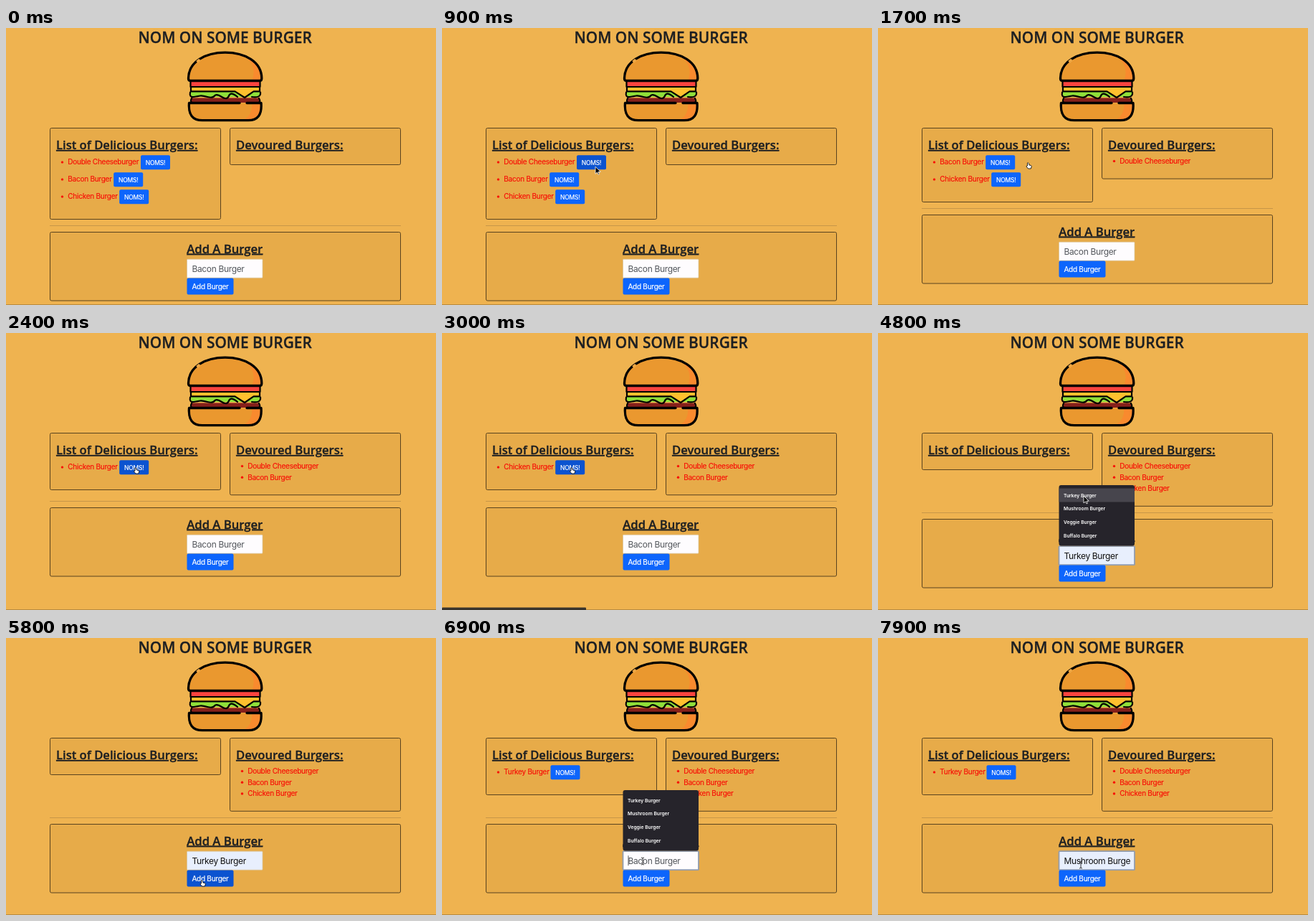
Recreate the animation shown at these times as an HTML page. Size 600x386 px, loop 8000 ms.

```html
<!DOCTYPE html>
<html lang="en">
<head>
<meta charset="utf-8">
<title>Nom on some burger</title>
<style>
html, body { margin: 0; width: 100%; height: 100%; overflow: hidden; background: #efb350; }
svg { display: block; width: 600px; height: 386px; }
text { font: 10px Inter, "Liberation Sans", sans-serif; letter-spacing: -.025em; white-space: pre; }
.h1, .h2 { font: 600 20.85px "Open Sans", sans-serif; letter-spacing: 0; fill: #1d1f22; stroke: #1d1f22; stroke-width: .3; }
.h2 { font-size: 16.65px; text-decoration: underline; }
.mid { text-anchor: middle; }
.item { fill: #f80c06; stroke: #f80c06; stroke-width: .15; }
.btn { fill: #fff; stroke: #fff; stroke-width: .2; }
.noms { font-size: 8.5px; }
.field { font-size: 12px; letter-spacing: -.03em; }
.option { font-size: 6.7px; font-weight: 600; letter-spacing: 0; fill: #fff; }
.card { fill: #e7ab49; stroke: #59431f; }
.line { fill: none; stroke: #000; stroke-width: 3.3; stroke-linejoin: round; stroke-linecap: round; }
.thin { stroke-width: 2.2; }
</style>
</head>
<body>
<svg viewBox="0 0 600 386">
  <defs>
    <clipPath id="fieldClip"><rect x="256" y="0" width="96" height="386"/></clipPath>
    <clipPath id="bunClip"><path id="bun" d="M257 73.500Q254.500 73.500 254.500 70C255 47 278 34.200 305.700 34.200S356.400 47 356.800 70Q356.800 73.500 354.300 73.500Z"/></clipPath>
    <clipPath id="baseClip"><path id="base" d="M255.500 104.500H356Q358 128.700 338 128.700H274Q253.500 128.700 255.500 104.500Z"/></clipPath>
  </defs>
  <rect width="600" height="386" fill="#efb350"/>
  <rect y="385" width="600" height="1" fill="#b88b41"/>
  <text class="h1 mid" x="305.600" y="20.500">NOM ON SOME BURGER</text>
  <g id="burger">
    <use href="#bun" fill="#ea982f"/>
    <path clip-path="url(#bunClip)" d="M325 33C345 46 349 58 343 74H360V33Z" fill="#f98a2e"/>
    <path d="M258 74H354V82H258Z" fill="#f9443f"/>
    <path d="M257 89H355Q354 97 346 96H266Q257 97 257 89Z" fill="#8fe03a"/>
    <path d="M259 97.500H353V104H259Z" fill="#86201b"/>
    <path d="M258 82.500H354V88H345.500L333 97 319.500 88H258Z" fill="#ffc02e"/>
    <use href="#base" fill="#ea982f"/>
    <path clip-path="url(#baseClip)" d="M343 104H360V130H328Q345 123 343 104Z" fill="#f98a2e"/>
    <use href="#bun" class="line"/>
    <path d="M266.500 47.500L270.500 44.300" stroke="#efa743" stroke-width="4"/>
    <path class="line thin" d="M257.500 74V82H354.500V74M258 82V88.300H319.500L333 97 345.500 88.300H354V82M257 89.500Q255.500 97 262 96T271 94.500 281 96 291 94.500 301 96 311 94.500 323 96M343 96Q356 98 355 89.500M259 98Q256 103.500 261 104M352 104Q356 103 353 98"/>
    <path class="line" d="M326 104.500H255.500Q253.500 128.700 274 128.700H338Q358 128.700 356 104.500H336"/>
  </g>
  <g id="scene"></g>
</svg>
<script>
const LOOP = 8000;
const scene = document.getElementById('scene');
const burgers = ['Double Cheeseburger', 'Bacon Burger', 'Chicken Burger'];
const nomsX = [188, 150.2, 158.2];
const eatenAt = [1400, 2300, 3200];
const options = ['Turkey Burger', 'Mushroom Burger', 'Veggie Burger', 'Buffalo Burger'];
const ADDED = 6050;

// time, x, y, pointer shape on the way to the next point
const path = [
  [200, 540, 375, 'arrow'], [950, 210, 191, 'hand'], [1750, 210, 191, 'hand'],
  [2150, 181.5, 191, 'hand'], [3300, 181.5, 191, 'arrow'], [3700, 271, 308, 'beam'],
  [4150, 271, 308, 'arrow'], [4600, 287, 227, 'arrow'], [5050, 287, 227, 'arrow'],
  [5500, 274, 341, 'hand'], [6250, 274, 341, 'arrow'], [6600, 280, 311, 'beam'],
  [6950, 280, 311, 'arrow'], [7250, 290, 246, 'arrow'], [7500, 290, 246, 'arrow'],
  [7800, 283, 316, 'beam'], [8000, 283, 316, 'beam']
];
const shapes = {
  arrow: '<path d="M0 0V10L2.500 7.800 4 11 5.500 10.300 4 7.200H7.200Z" fill="#000" stroke="#fff" stroke-width=".8"/>',
  hand: '<path d="M-1.500-3Q-.5-4 .3-2.500L1 0 3.500.5Q4.500 1 4 3L3.300 5H-.5L-3 2Q-3 .7-1.500 1Z" fill="#fff" stroke="#111" stroke-width=".9"/>',
  beam: '<path d="M-2-5Q0-5 0-3.500Q0-5 2-5M0-3.500V3.500M-2 5Q0 5 0 3.500Q0 5 2 5" fill="none" stroke="#222" stroke-width=".9"/>'
};

const text = (cls, x, y, s, extra = '') => `<text class="${cls}" x="${x}" y="${y}" ${extra}>${s}</text>`;
const box = (x, y, w, h, r, attrs) => `<rect x="${x}" y="${y}" width="${w}" height="${h}" rx="${r}" ${attrs}/>`;
const card = (x, y, w, h) => box(x, y, w, h, 2, 'class="card"');
const bullet = (x, y) => `<circle cx="${x}" cy="${y}" r="1.600" class="item"/>`;
const between = (t, a, b) => t >= a && t < b;

function pointerAt(t) {
  const i = path.findIndex(p => p[0] > t);
  if (i < 1) return null;
  const [t0, x0, y0, kind] = path[i - 1], [t1, x1, y1] = path[i];
  const k = (t - t0) / (t1 - t0), e = k * k * (3 - 2 * k);
  return { x: x0 + (x1 - x0) * e, y: y0 + (y1 - y0) * e, kind };
}

function button(x, y, w, h, label, cls, p) {
  const over = p && p.x > x && p.x < x + w && p.y > y && p.y < y + h;
  return box(x, y, w, h, 2, `fill="${over ? '#0b53d0' : '#0d65fc'}"`) +
    text('btn mid ' + cls, x + w / 2, y + h / 2 + (cls ? 3.2 : 3.6), label);
}

function lists(t, p) {
  const left = burgers.map((name, i) => [name, nomsX[i]]).filter((_, i) => t < eatenAt[i]);
  if (t >= ADDED) left.push([options[0], 151.5]);
  const right = burgers.filter((_, i) => t >= eatenAt[i]);
  const leftEnd = left.length ? 194.5 + 24 * left.length : 190.5;
  const rightEnd = right.length ? 194.5 + 15.6 * right.length : 190.5;
  let out = card(61.5, 139.5, 238, leftEnd - 139.5) + card(312.5, 139.5, 238, rightEnd - 139.5);
  out += text('h2', 70, 169, 'List of Delicious Burgers:') + text('h2', 321, 169, 'Devoured Burgers:');
  left.forEach(([name, x], i) => {
    const y = 187 + 24 * i;
    out += bullet(78.5, y) + text('item', 86.3, y + 3.3, name) + button(x, y - 9.7, 41, 20, 'NOMS!', 'noms', p);
  });
  right.forEach((name, i) => {
    const y = 185.5 + 15.7 * i;
    out += bullet(329.5, y) + text('item', 337.2, y + 3.4, name);
  });
  return [out, Math.max(leftEnd, rightEnd)];
}

function form(t, p, end) {
  const top = Math.floor(end + 18) + .5;
  const menu = between(t, 3800, 5000) || between(t, 6700, 7500);
  const focus = between(t, 3750, 5650) || t >= 6650;
  const hover = menu && p ? Math.floor((p.y - 216.5) / 19) : -1;
  const hovered = hover >= 0 && hover < 4 ? options[hover] : '';
  const value = menu ? hovered : between(t, 5000, ADDED) ? options[0] : t >= 7500 ? options[1] : '';
  const y = top + 37.7;

  let out = `<path d="M61 ${top - 9}H551" stroke="#c79648"/>` + card(61.5, top, 489, 95.5);
  out += text('h2 mid', 305.3, top + 29, 'Add A Burger');
  out += box(252.5, y, 105.5, 26, 1, `fill="${value ? '#e8effd' : '#fefcfe'}" stroke="${focus ? '#929cad' : '#d9c49b'}" stroke-width="${focus ? 1.8 : .7}"`);
  out += text('field', 259.5, y + 17.6, value || 'Bacon Burger',
    `fill="${value ? '#111' : '#54585d'}" clip-path="url(#fieldClip)"`);
  if (focus && !value) out += `<path d="M260 ${y + 6}v14" stroke="#333" stroke-width=".8"/>`;
  out += button(252.5, top + 64, 65, 23, 'Add Burger', '', p);
  if (menu) {
    out += box(252.5, 212, 105.5, 84.5, 3, 'fill="#26242b"');
    if (hovered) out += box(252.5, 216.5 + 19 * hover, 105.5, 19, 0, 'fill="#47454d"');
    options.forEach((name, i) => out += text('option', 259, 228.5 + 18.8 * i, name));
  }
  return out;
}

function draw(now) {
  const t = now % LOOP;
  const p = pointerAt(t);
  const [top, end] = lists(t, p);
  let out = top + form(t, p, end);
  if (between(t, 2900, 3300)) out += box(0, 382.5, 201, 5, 1, 'fill="#39342c"');
  if (p) out += `<g transform="translate(${p.x} ${p.y})">${shapes[p.kind]}</g>`;
  scene.innerHTML = out;
  requestAnimationFrame(draw);
}
requestAnimationFrame(draw);
</script>
</body>
</html>
```
